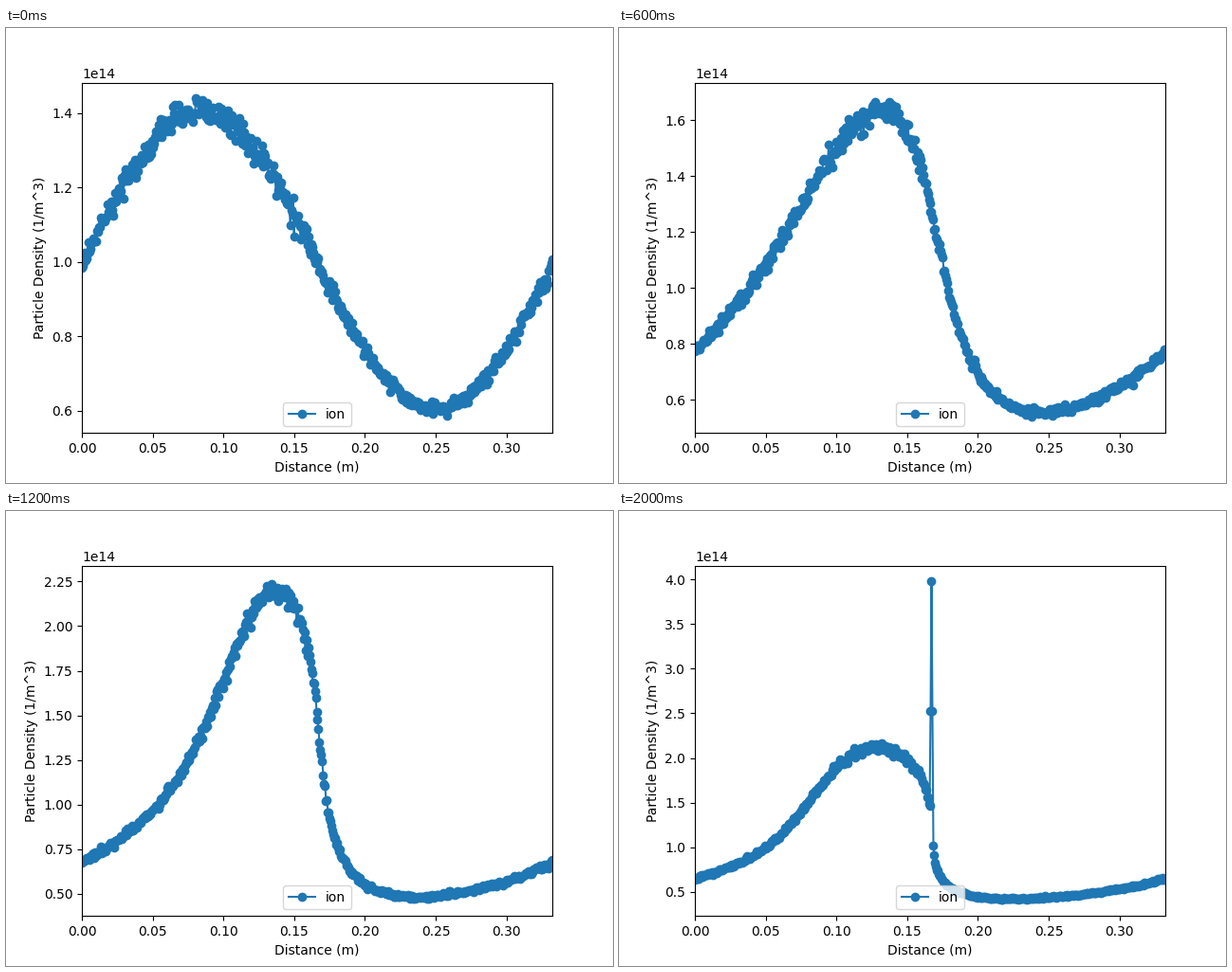
A matplotlib script for the animation above (2.1 s loop, 640 by 480 pixels).

```python
import numpy as np
import matplotlib.pyplot as plt
from matplotlib.animation import FuncAnimation

FRAMES, STEP = 21, 100
LEFT, RIGHT, CELLS = -0.00005, 0.33245, 500
WAVELENGTH = 1 / 3
UNIT = 1e14

x = np.linspace(LEFT, RIGHT, CELLS)
phase = np.linspace(-2 * np.pi, 4 * np.pi, 6000)


def ramp(s, mid, width):
    return 1 / (1 + np.exp((mid - s) / width))


def wave(s):
    """Smooth density: a sine in log space on a phase that steepens with s."""
    drift = 360 * s ** 1.5 * np.exp(-3 * s)
    lean = 40 * ramp(s, 0.29, 0.07) - 12 - 8 * s ** 2
    push = 39 * (1 - np.exp(-s / 0.23))
    late = ramp(s, 0.48, 0.08)
    shift = (drift + lean * np.cos(phase) + push * np.sin(phase)
             + 7.5 * late * np.cos(2 * phase) - 7 * s ** 2 * np.sin(2 * phase)
             + 3 * late * np.cos(3 * phase))
    pos = (phase + np.radians(shift)) * WAVELENGTH / (2 * np.pi)
    mean = 0.115 * np.exp(-((s - 0.63) / 0.32) ** 2) - 0.085
    swing = 0.410 + 0.394 * ramp(s, 0.38, 0.11)
    return np.exp(mean + swing * np.sin(np.interp(x, pos, phase)))


def density(i):
    """Noisy density with its lowest and highest value, in units of 1e14."""
    s = i / (FRAMES - 1)
    smooth = wave(s)
    rng = np.random.default_rng(40 + i)
    y = smooth * (1 + 0.013 * rng.standard_normal(CELLS))
    # The shock spike grows exponentially and emerges from the wave front
    spike = 3.975 * np.exp(3.37 * (s - 1))
    front = x[np.abs(x - 0.1675 - 0.028 * (s - 1)).argmin()]
    y = np.maximum(y, spike * np.exp(-((x - front) / 0.0007) ** 2 / 2))
    low = 0.965 * smooth.min()
    high = max(1.025 * smooth.max(), spike)
    return np.clip(y, low, high), low, high


fig, ax = plt.subplots(figsize=(6.4, 4.8), dpi=100)
line, = ax.plot(x, wave(0) * UNIT, "o-", color="#1f77b4", label="ion")
ax.set_xlim(LEFT, RIGHT)
ax.set_xlabel("Distance (m)")
ax.set_ylabel("Particle Density (1/m^3)")
ax.legend(loc="lower center")


def update(i):
    y, low, high = density(i)
    line.set_ydata(y * UNIT)
    pad = 0.05 * (high - low)
    ax.set_ylim((low - pad) * UNIT, (high + pad) * UNIT)
    return line,


anim = FuncAnimation(fig, update, frames=FRAMES, interval=STEP,
                     repeat=True, repeat_delay=0, blit=False)
plt.show()
```
